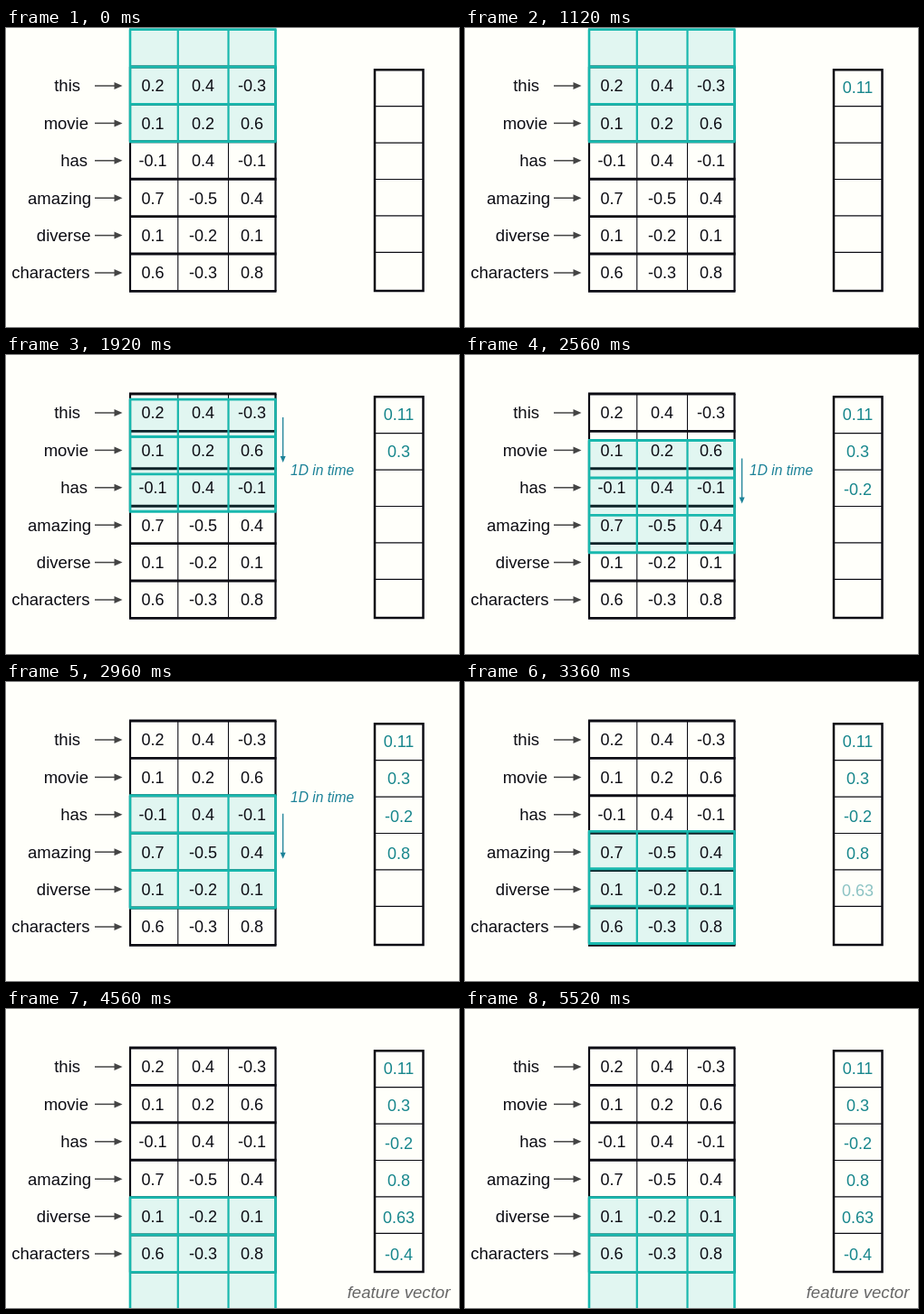
Write an HTML page that moves like this. It is 500 px wide and 331 px high and loops after 5.6 s.

```html
<!DOCTYPE html>
<html lang="en">
<head>
<meta charset="utf-8">
<title>1D convolution over text</title>
<style>
  html, body { margin: 0; width: 100%; height: 100%; overflow: hidden; background: #fffffa; }
  svg { display: block; width: 500px; height: 331px; }
  text { font-family: "Liberation Sans", Arial, sans-serif; font-size: 18px; }
  .mid { text-anchor: middle; }
  .word { font-size: 18.5px; text-anchor: end; }
  .out { fill: #17868c; }
  .note { font-size: 15.6px; font-style: italic; fill: #1c8298; }
  .caption { font-size: 18.6px; font-style: italic; fill: #666; }
</style>
</head>
<body>
<svg id="stage" viewBox="0 0 500 331"></svg>
<script>
const NS = "http://www.w3.org/2000/svg";
const stage = document.getElementById("stage");

function add(parent, tag, attrs, text) {
  const el = document.createElementNS(NS, tag);
  for (const key in attrs) el.setAttribute(key, attrs[key]);
  if (text !== undefined) el.textContent = text;
  parent.appendChild(el);
  return el;
}
const line = (parent, d, stroke, width) =>
  add(parent, "path", { d, stroke, "stroke-width": width, fill: "none" });

const LOOP = 5600, STEP = 80;
const FIRST = 1207, PERIOD = 610, SLIDE = 380;
const TOP = 43, PITCH = 41.4, LEFT = 137, RIGHT = 297.5;
const INNER = [189.8, 245.5], CENTERS = [162, 217.5, 271.5];
const INK = "#0d0d14", TEAL = "#19b8ae", HINT = "#1c8298";

// word, right edge, embedding, filter output
const rows = [
  ["this", 82, ["0.2", "0.4", "-0.3"], "0.11"],
  ["movie", 91, ["0.1", "0.2", "0.6"], "0.3"],
  ["has", 90, ["-0.1", "0.4", "-0.1"], "-0.2"],
  ["amazing", 94, ["0.7", "-0.5", "0.4"], "0.8"],
  ["diverse", 93.5, ["0.1", "-0.2", "0.1"], "0.63"],
  ["characters", 92.5, ["0.6", "-0.3", "0.8"], "-0.4"]
];

// Embedding matrix
const bottom = TOP + PITCH * 6;
INNER.forEach(x => line(stage, `M${x} ${TOP}V${bottom}`, INK, 1.1));
for (let i = 0; i <= 6; i++)
  line(stage, `M${LEFT - 1} ${TOP + PITCH * i}H${RIGHT + 1}`, INK, 2.9);
line(stage, `M${LEFT} ${TOP}V${bottom}M${RIGHT} ${TOP}V${bottom}`, INK, 2.2);

// Sliding filter, three rows high
const filter = add(stage, "g", {});
add(filter, "rect", { x: LEFT, y: 0, width: RIGHT - LEFT, height: PITCH * 3,
  fill: TEAL, "fill-opacity": 0.13 });
INNER.forEach(x => line(filter, `M${x} 0V${PITCH * 3}`, TEAL, 2.2));
for (let i = 0; i <= 3; i++)
  line(filter, `M${LEFT - 1} ${PITCH * i}H${RIGHT + 1}`, TEAL, 2.9);
line(filter, `M${LEFT} 0V${PITCH * 3}M${RIGHT} 0V${PITCH * 3}`, TEAL, 2.6);

// Output column
for (let i = 1; i < 6; i++)
  line(stage, `M407 ${46.3 + 40.4 * i}H460`, INK, 1.2);
add(stage, "rect", { x: 407, y: 46.3, width: 53.5, height: 244.7,
  fill: "none", stroke: INK, "stroke-width": 2.5 });

const outputs = rows.map(([word, edge, values, result], i) => {
  const y = 64 + PITCH * i;
  add(stage, "text", { x: edge, y: y + 6.4, class: "word", fill: INK }, word);
  line(stage, `M98 ${y}H121`, "#444", 1.5);
  add(stage, "path", { d: `M119.5 ${y - 4}L128.5 ${y}L119.5 ${y + 4}Z`, fill: "#444" });
  values.forEach((v, c) =>
    add(stage, "text", { x: CENTERS[c], y: y + 6.4, class: "mid", fill: INK }, v));
  return add(stage, "text", { x: 433.5, y: 72.3 + 41.1 * i, class: "mid out" }, result);
});

// Direction hint and caption
const hint = add(stage, "g", {});
const arrow = add(hint, "g", {});
line(arrow, "M305.7 20V65", HINT, 1.3);
add(arrow, "path", { d: "M302.7 63L305.7 70L308.7 63Z", fill: HINT });
add(hint, "text", { x: 314, y: 133, class: "note" }, "1D in time");
const caption = add(stage, "text", { x: 433.5, y: 319.5, class: "mid caption" }, "feature vector");

const ramp = (t, start, length) => Math.min(1, Math.max(0, (t - start) / length));
const ease = u => u < 0.5 ? 2 * u * u : 1 - 2 * (1 - u) * (1 - u);
const fade = (el, a) => el.setAttribute("opacity", a);

function draw(t) {
  let pos = 0;
  for (let i = 0; i < 5; i++) pos += ease(ramp(t, FIRST + PERIOD * i, SLIDE));
  const y = TOP - PITCH + PITCH * pos;
  filter.setAttribute("transform", `translate(0 ${y})`);
  arrow.setAttribute("transform", `translate(0 ${y})`);
  outputs.forEach((el, i) => fade(el, ramp(t, FIRST + PERIOD * (i - 1) + 264, 120)));
  fade(hint, ramp(t, FIRST, 140) - ramp(t, FIRST + PERIOD * 3, 140));
  fade(caption, ramp(t, 4220, 200));
}

const origin = performance.now();
function tick() {
  const t = (performance.now() - origin) % LOOP;
  draw(Math.floor(t / STEP) * STEP);
  requestAnimationFrame(tick);
}
tick();
</script>
</body>
</html>
```
